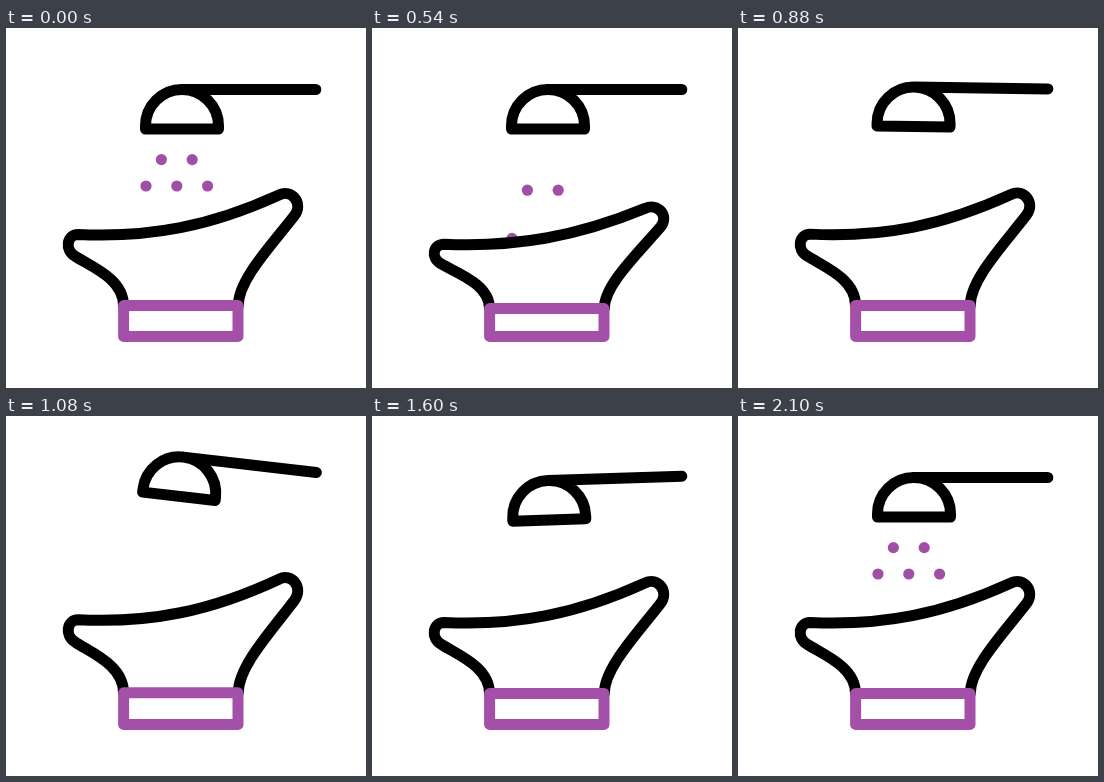
An HTML page that plays this animation: 360x360 px, repeating every 2.4 s.

```html
<!DOCTYPE html>
<html>
<head>
<meta charset="utf-8">
<style>
html, body { margin: 0; height: 100%; overflow: hidden; background: #fff; }
svg { display: block; width: 100vw; height: 100vh; }
#bowl path { vector-effect: non-scaling-stroke; }
</style>
</head>
<body>
<svg viewBox="0 0 360 360" stroke-width="11" stroke-linecap="round" stroke-linejoin="round" fill="none">
  <g fill="#a04fa6">
    <g id="low"><circle cx="140" cy="158" r="5.6"/><circle cx="170.8" cy="158" r="5.6"/><circle cx="201.6" cy="158" r="5.6"/></g>
    <g id="high"><circle cx="155.4" cy="131.6" r="5.6"/><circle cx="186.2" cy="131.6" r="5.6"/></g>
  </g>
  <g id="bowl">
    <path fill="#fff" stroke="#000" d="M117.5 277.5C117.5 251 86 239 69.5 228.5C58 222 61 206.5 72 206.5C145 210 205 198 273 167C286 160.5 297.5 175.5 288.5 187.5C264 219 232.3 252 232.3 277.5"/>
    <path fill="#fff" stroke="#a550a8" d="M117.6 277.6H232V308.4H117.6Z"/>
  </g>
  <path id="spoon" stroke="#000" d="M139.5 101V98a36.5 36.5 0 0 1 73 0v3ZM176 61.5H309.8"/>
</svg>
<script>
const LOOP = 2400, FLOOR = 308.4;
const [low, high, bowl, spoon] = ['low', 'high', 'bowl', 'spoon'].map(id => document.getElementById(id));

// Eased value at time t through [time, value] keys
function track(t, ...keys) {
  if (t <= keys[0][0]) return keys[0][1];
  for (let i = 1; i < keys.length; i++) {
    const [t0, a] = keys[i - 1], [t1, b] = keys[i];
    if (t < t1) return a + (b - a) * (1 - Math.cos(Math.PI * (t - t0) / (t1 - t0))) / 2;
  }
  return keys[keys.length - 1][1];
}

function drop(row, t, start, end, depth) {
  const back = t > 1500;
  row.setAttribute('transform', `translate(0 ${back ? 0 : track(t, [start, 0], [end, depth])})`);
  row.setAttribute('opacity', back ? track(t, [1820, 0], [2100, 1]) : t < end ? 1 : 0);
}

function draw(now) {
  const t = now % LOOP;
  drop(low, t, 200, 700, 68);
  drop(high, t, 300, 920, 93);

  const squash = track(t, [200, 1], [600, 0.9], [1000, 1.03], [1400, 1]);
  bowl.setAttribute('transform', `translate(0 ${FLOOR}) scale(1 ${squash}) translate(0 ${-FLOOR})`);

  const angle = track(t, [800, 0], [1200, 8.3], [1600, -1.8], [2000, 0]);
  const x = track(t, [800, 0], [1200, 0.7], [1600, 0]);
  const y = track(t, [800, 0], [1200, -6.2], [1600, -1.2], [2000, 0]);
  spoon.setAttribute('transform', `translate(${x} ${y}) rotate(${angle} 310 61.5)`);

  requestAnimationFrame(() => draw(performance.now() - begin));
}
const begin = performance.now();
draw(0);
</script>
</body>
</html>
```
